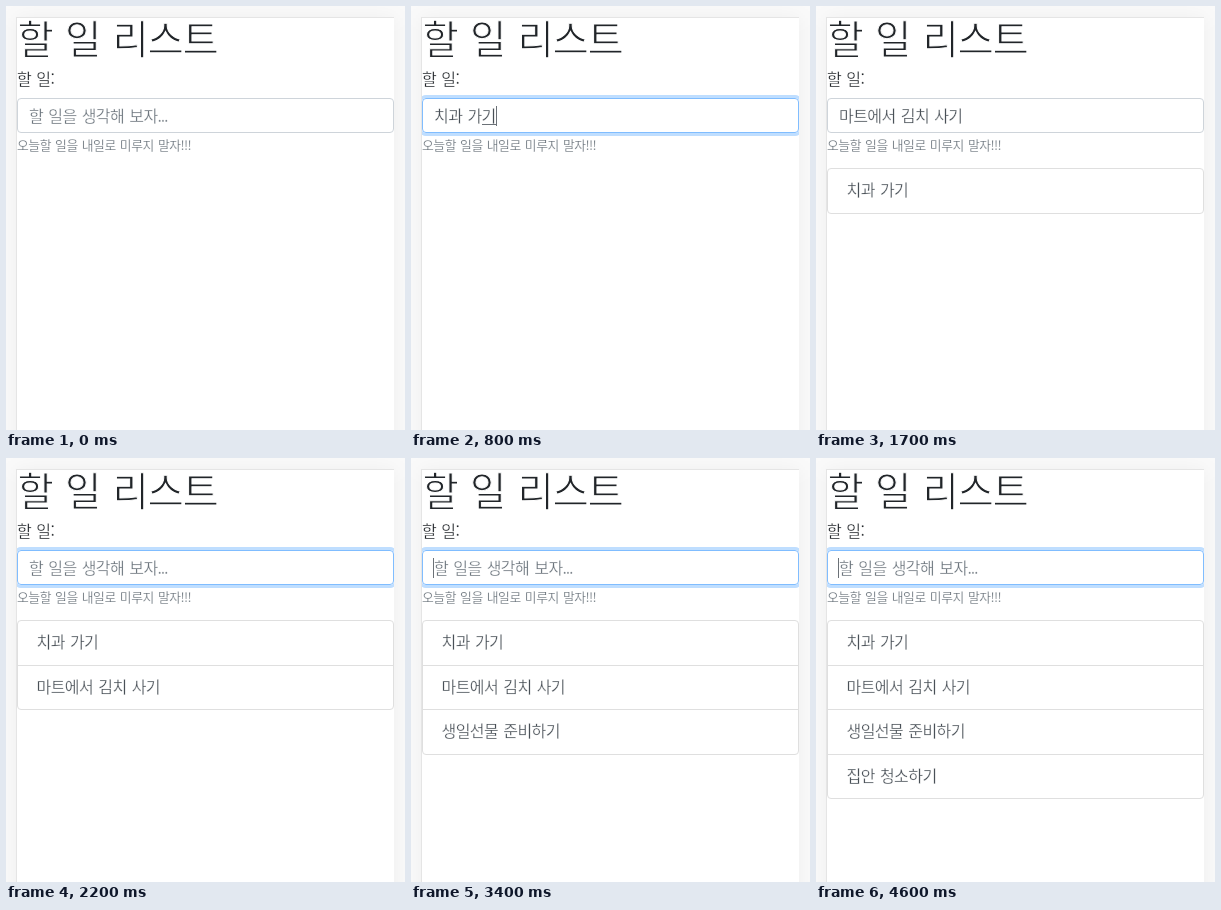
Write an HTML page that moves like this. It is 399 px wide and 424 px high and loops after 6600 ms.

```html
<!DOCTYPE html>
<html lang="ko">
<head>
<meta charset="utf-8">
<title>할 일 리스트</title>
<style>
  html, body { margin: 0; width: 100%; height: 100%; overflow: hidden; background: #fafafa; }
  svg { display: block; }
  /* The white outline thins the regular weight to a lighter one. */
  text {
    font-family: "Noto Sans CJK KR", "Noto Sans CJK", "Noto Sans CJK JP", sans-serif;
    font-size: 16px; letter-spacing: -.034em; word-spacing: .07em;
    fill: #495057; stroke: #fff; stroke-width: .016em; white-space: pre;
  }
  .dark { fill: #212529; }
  .muted { fill: #6c757d; }
  .title { font-size: 39.5px; stroke-width: .025em; }
  .hint { font-size: 12.8px; }
  .dots { letter-spacing: -.075em; }
  .bangs { letter-spacing: -.055em; }
  .frame { fill: none; stroke: #dfdfdf; }
  .cursor { fill: #6b7177; }
</style>
</head>
<body>
<svg width="399" height="424" viewBox="0 0 399 424">
  <defs>
    <clipPath id="panel"><rect x="11" y="12" width="377" height="412"/></clipPath>
    <filter id="soft"><feGaussianBlur stdDeviation="10"/></filter>
  </defs>
  <rect width="399" height="424" fill="#fafafa"/>
  <rect x="11" y="12" width="377" height="500" fill-opacity=".05" filter="url(#soft)"/>
  <rect x="10" y="11" width="378" height="413" fill="#e5e5e5"/>
  <rect x="11" y="12" width="377" height="412" fill="#fff"/>
  <text class="dark title" x="11.5" y="47.5">할 일 리스트</text>
  <text class="dark" x="11" y="79">할 일:</text>
  <g clip-path="url(#panel)">
    <rect id="glow" x="9.5" y="90.5" width="380" height="38" rx="5.5" fill="none" stroke="#bfdeff" stroke-width="3"/>
    <rect id="field" x="11.5" y="92.5" width="376" height="34" rx="3.5" fill="#fff"/>
  </g>
  <text id="placeholder" class="muted" x="23" y="116">할 일을 생각해 보자<tspan class="dots">...</tspan></text>
  <text id="value" x="23" y="116"></text>
  <rect id="underline" class="cursor" y="118" width="14" height="1"/>
  <rect id="caret" class="cursor" y="100" width="1" height="20"/>
  <text class="muted hint" x="11" y="144">오늘할 일을 내일로 미루지 말자<tspan class="bangs">!!!</tspan></text>
  <g id="list"></g>
</svg>
<script>
const LOOP = 6600;
const SYLLABLE = 14.4, SPACE = 4.4, TEXT_X = 23;
const TASKS = ["치과 가기", "마트에서 김치 사기", "생일선물 준비하기", "집안 청소하기"];
const LINES = [162.5, 207.5, 251.5, 296.5, 340.5];

// start time, typed text, focused, caret shown, finished tasks
const STEPS = [
  [0, "", false, false, 0],
  [200, "치", true, true, 0],
  [400, "치과", true, true, 0],
  [600, "치과 가", true, true, 0],
  [800, TASKS[0], true, true, 0],
  [1000, "", true, true, 1],
  [1200, TASKS[1], true, true, 1],
  [1700, TASKS[1], false, false, 1],
  [2200, "", true, false, 2],
  [2900, TASKS[2], false, false, 2],
  [3400, "", true, true, 3],
  [4100, TASKS[3], true, true, 3],
  [4600, "", true, true, 4]
];

const $ = id => document.getElementById(id);
const show = (id, on) => $(id).setAttribute("visibility", on ? "visible" : "hidden");
const textWidth = s => [...s].reduce((w, c) => w + (c === " " ? SPACE : SYLLABLE), 0);

function listMarkup(count) {
  if (!count) return "";
  const height = LINES[count] - LINES[0];
  let out = `<rect class="frame" x="11.5" y="${LINES[0]}" width="376" height="${height}" rx="3.5"/>`;
  for (let i = 0; i < count; i++) {
    if (i) out += `<path class="frame" d="M11 ${LINES[i]}H388"/>`;
    out += `<text x="30.5" y="${190 + i * 44.7}">${TASKS[i]}</text>`;
  }
  return out;
}

function render([, typed, focused, caret, count]) {
  const end = TEXT_X + textWidth(typed);
  show("glow", focused);
  $("field").setAttribute("stroke", focused ? "#80bdff" : "#ced4da");
  show("placeholder", !typed);
  $("value").textContent = typed;
  show("caret", caret);
  $("caret").setAttribute("x", typed ? Math.floor(end) : TEXT_X - 1);
  show("underline", caret && typed);
  $("underline").setAttribute("x", Math.round(end - SYLLABLE));
  $("list").innerHTML = listMarkup(count);
}

let current;
function tick() {
  const t = performance.now() % LOOP;
  const step = STEPS.findLast(s => s[0] <= t);
  if (step !== current) render(current = step);
  requestAnimationFrame(tick);
}
tick();
</script>
</body>
</html>
```
